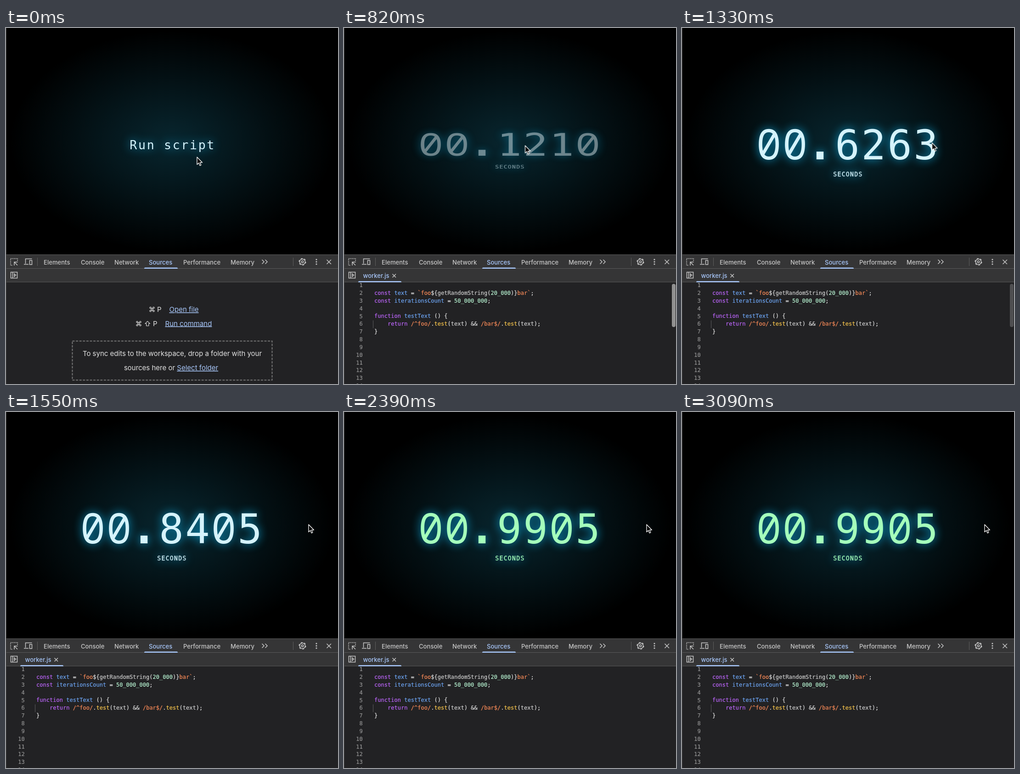
Recreate the animation shown at these times as an HTML page. Size 723x775 px, loop 3.12 s.

```html
<!DOCTYPE html>
<html lang="en">
<head>
<meta charset="utf-8">
<title>Script timer</title>
<style>
  html, body { margin: 0; width: 100%; height: 100%; overflow: hidden; background: #000; }
  .stage { position: absolute; left: 0; top: 0; width: 723px; height: 775px; overflow: hidden; }
  .glow { position: absolute; inset: 0 0 282px 0; background: radial-gradient(ellipse at center, #08262f 0%, #000 69%); }
  svg { position: absolute; left: 0; top: 0; }
  text { white-space: pre; }

  .clock, .run { font-family: "DejaVu Sans Mono", Menlo, monospace; color: #d5f3fc; fill: currentColor; filter: drop-shadow(0 0 10px rgba(10, 175, 230, .9)); transform-origin: 361px 253.5px; }
  .run { font-size: 26.6px; letter-spacing: .1em; animation: leave 3120ms linear infinite; }
  .clock { animation: enter 3120ms linear infinite, finish 3120ms linear infinite; }
  .digit { font-size: 89px; text-anchor: middle; }
  .zero { font-family: "Noto Sans Mono", monospace; font-size: 91px; }
  .point { font-size: 95px; font-weight: bold; }
  .unit { font-size: 13.2px; letter-spacing: 1.25px; stroke: currentColor; stroke-width: .3; }

  .ui { font-family: Inter, Roboto, sans-serif; font-size: 13.1px; fill: #c7c7c7; }
  .tabs, .file { font-weight: 500; }
  .ui .on, .file { fill: #a8c7fa; }
  .icon { fill: none; stroke: #c7c7c7; stroke-width: 1.5; }
  .start { font-size: 15px; fill: #e3e3e3; animation: before 3120ms linear infinite; }
  .start .link { fill: #a8c7fa; text-decoration: underline; }
  .mid { text-anchor: middle; }
  .editor { animation: after 3120ms linear infinite; }
  .scrollbar { animation: fade 3120ms linear infinite; }
  .code { font: 12px "DejaVu Sans Mono", Menlo, monospace; letter-spacing: .02px; color: #e3e3e3; }
  .code text, .code tspan { fill: currentColor; stroke: currentColor; stroke-width: .2; }
  .num { color: #919191; text-anchor: end; }
  .k { color: #bf67ff; } .d { color: #6fa8f8; } .s { color: #fe8d59; }
  .n { color: #b5f0cf; } .p { color: #fcc84d; } .v { color: #d0d0d0; }
  .cursor { animation: point 3120ms linear infinite; }

  @keyframes leave {
    0%, 18.3% { opacity: 1; transform: none; }
    22.4%, 100% { opacity: 0; transform: scaleY(.5); }
  }
  @keyframes enter {
    0%, 22.4% { opacity: 0; transform: scaleY(.5); }
    30.2%, 100% { opacity: 1; transform: none; }
  }
  @keyframes finish {
    0%, 54.5% { color: #d5f3fc; }
    58%, 100% { color: #a5ffbb; }
  }
  @keyframes before {
    0%, 22.39% { opacity: 1; }
    22.4%, 100% { opacity: 0; }
  }
  @keyframes after {
    0%, 22.39% { opacity: 0; }
    22.4%, 100% { opacity: 1; }
  }
  @keyframes fade {
    0%, 38% { opacity: 1; }
    46%, 100% { opacity: 0; }
  }
  @keyframes point {
    0%, 2% { transform: translate(416px, 281px); animation-timing-function: ease-in-out; }
    14%, 37% { transform: translate(394.5px, 256px); animation-timing-function: ease-in-out; }
    47.5%, 100% { transform: translate(659px, 245px); }
  }
</style>
</head>
<body>
<div class="stage">
  <div class="glow"></div>
  <svg width="723" height="775" viewBox="0 0 723 775">
    <text class="run" x="269.3" y="263.5">Run script</text>
    <g class="clock">
      <g id="digits"></g>
      <text class="unit" x="329.3" y="322.8">SECONDS</text>
    </g>

    <!-- Panel -->
    <rect y="493" width="723" height="60" fill="#353536"/>
    <rect y="553" width="723" height="222" fill="#222224"/>
    <path d="M0 493.5H723M0 523.5H723M0 553H723" stroke="#5a5a5b"/>
    <path d="M68.5 500V518M625.5 500V518" stroke="#5e5e5e"/>

    <g class="ui tabs">
      <text x="82" y="514.5">Elements</text>
      <text x="163" y="514.5">Console</text>
      <text x="236" y="514.5">Network</text>
      <text class="on" x="311" y="514.5">Sources</text>
      <text x="386" y="514.5">Performance</text>
      <text x="489" y="514.5">Memory</text>
    </g>
    <path d="M301 524V523.5Q301 521.5 303 521.5H372Q374 521.5 374 523.5V524Z" fill="#a8c7fa"/>

    <g class="icon">
      <path d="M25 507V502H10V516.5H15" stroke-dasharray="2 1.6"/>
      <path d="M18 517V509.5H25.5M18.5 510L25 516.5"/>
      <path d="M56.5 502.5H42.5V513M39 514.5H49M51.5 506H56.5V515H51.5Z"/>
      <path d="M557.5 504.5L562 509L557.5 513.5M564.5 504.5L569 509L564.5 513.5"/>
      <circle cx="645.5" cy="509" r="6"/>
      <circle cx="645.5" cy="509" r="7.3" stroke-width="1.6" stroke-dasharray="3.82 3.82"/>
      <circle cx="645.5" cy="509" r="2.2"/>
      <path d="M698.5 504.5L708 514M708 504.5L698.5 514"/>
      <path d="M10.5 531.5H24.5V544.5H10.5ZM14.5 531.5V544.5M18 535L21.5 538L18 541Z"/>
    </g>
    <g fill="#c7c7c7">
      <circle cx="676" cy="504" r="1.6"/>
      <circle cx="676" cy="509" r="1.6"/>
      <circle cx="676" cy="514" r="1.6"/>
    </g>

    <g class="ui start">
      <text x="310.5" y="618">⌘</text>
      <text x="329" y="618">P</text>
      <text class="link" x="355.5" y="618">Open file</text>
      <text x="281.5" y="648.5">⌘</text>
      <text x="300.5" y="648.5">⇧</text>
      <text x="320" y="648.5">P</text>
      <text class="link" x="346.5" y="648.5">Run command</text>
      <rect x="144.5" y="681.5" width="435" height="85" fill="none" stroke="#757575" stroke-width="2" stroke-dasharray="5 2.6"/>
      <text class="mid" x="362" y="714">To sync edits to the workspace, drop a folder with your</text>
      <text class="mid" x="359.5" y="745">sources here or <tspan class="link">Select folder</tspan></text>
    </g>

    <g class="editor">
      <g class="ui"><text class="file" x="41.5" y="544">worker.js</text></g>
      <path class="icon" d="M105.5 535.5L113 543M113 535.5L105.5 543"/>
      <path d="M31 553.5V553Q31 551 33 551H123Q125 551 125 553V553.5Z" fill="#a8c7fa"/>
      <g class="code" id="numbers"></g>
      <path d="M63.5 636.5V653.5" stroke="#5c5c5c"/>
      <g class="code">
        <text x="66" y="581"><tspan class="k">const</tspan> <tspan class="d">text</tspan> = <tspan class="s">`foo</tspan>${<tspan class="v">getRandomString</tspan>(<tspan class="n">20_000</tspan>)}<tspan class="s">bar`</tspan>;</text>
        <text x="66" y="597.8"><tspan class="k">const</tspan> <tspan class="d">iterationsCount</tspan> = <tspan class="n">50_000_000</tspan>;</text>
        <text x="66" y="631.4"><tspan class="k">function</tspan> <tspan class="d">testText</tspan> () {</text>
        <text x="95" y="648.2"><tspan class="k">return</tspan> <tspan class="s">/^foo/</tspan>.<tspan class="p">test</tspan>(<tspan class="v">text</tspan>) &amp;&amp; <tspan class="s">/bar$/</tspan>.<tspan class="p">test</tspan>(<tspan class="v">text</tspan>);</text>
        <text x="66" y="665">}</text>
      </g>
      <rect class="scrollbar" x="714" y="557" width="8" height="94" rx="4" fill="#919191"/>
    </g>

    <path d="M.5 0V775" stroke="#3c3c3c"/>
    <path class="cursor" d="M0 0V16.2L3.8 12.8L6.2 18.6L8.8 17.5L6.4 11.8H11.4Z" fill="#000" stroke="#fff" stroke-width="1.3" stroke-linejoin="round"/>
  </svg>
</div>
<script>
  const LOOP = 3120;
  // Elapsed ms and the seconds shown then
  const COUNT = [[698, 0], [820, .121], [1120, .4219], [1550, .8405], [1704, .9905]];

  function addText(parent, x, y, cls, value) {
    const el = document.createElementNS("http://www.w3.org/2000/svg", "text");
    el.setAttribute("x", x);
    el.setAttribute("y", y);
    el.setAttribute("class", cls);
    el.textContent = value;
    parent.append(el);
    return el;
  }

  const numbers = document.getElementById("numbers");
  for (let i = 0; i < 14; i++) addText(numbers, 40.8, 564.2 + i * 16.83, "num", i + 1);

  const holder = document.getElementById("digits");
  const digits = Array.from({ length: 7 }, (_, i) => addText(holder, 189 + i * 57, 286, "digit", "0"));
  digits[2].classList.add("point");
  digits[2].setAttribute("x", 300.5);

  function secondsAt(t) {
    if (t <= COUNT[0][0]) return 0;
    const next = COUNT.findIndex(([time]) => time > t);
    if (next < 0) return COUNT[COUNT.length - 1][1];
    const [t0, v0] = COUNT[next - 1], [t1, v1] = COUNT[next];
    return v0 + (v1 - v0) * (t - t0) / (t1 - t0);
  }

  let start;
  function draw(now) {
    start ??= now;
    const shown = secondsAt((now - start) % LOOP).toFixed(4).padStart(7, "0");
    digits.forEach((el, i) => {
      el.textContent = shown[i];
      el.classList.toggle("zero", shown[i] === "0");
    });
    requestAnimationFrame(draw);
  }
  requestAnimationFrame(draw);
</script>
</body>
</html>
```
